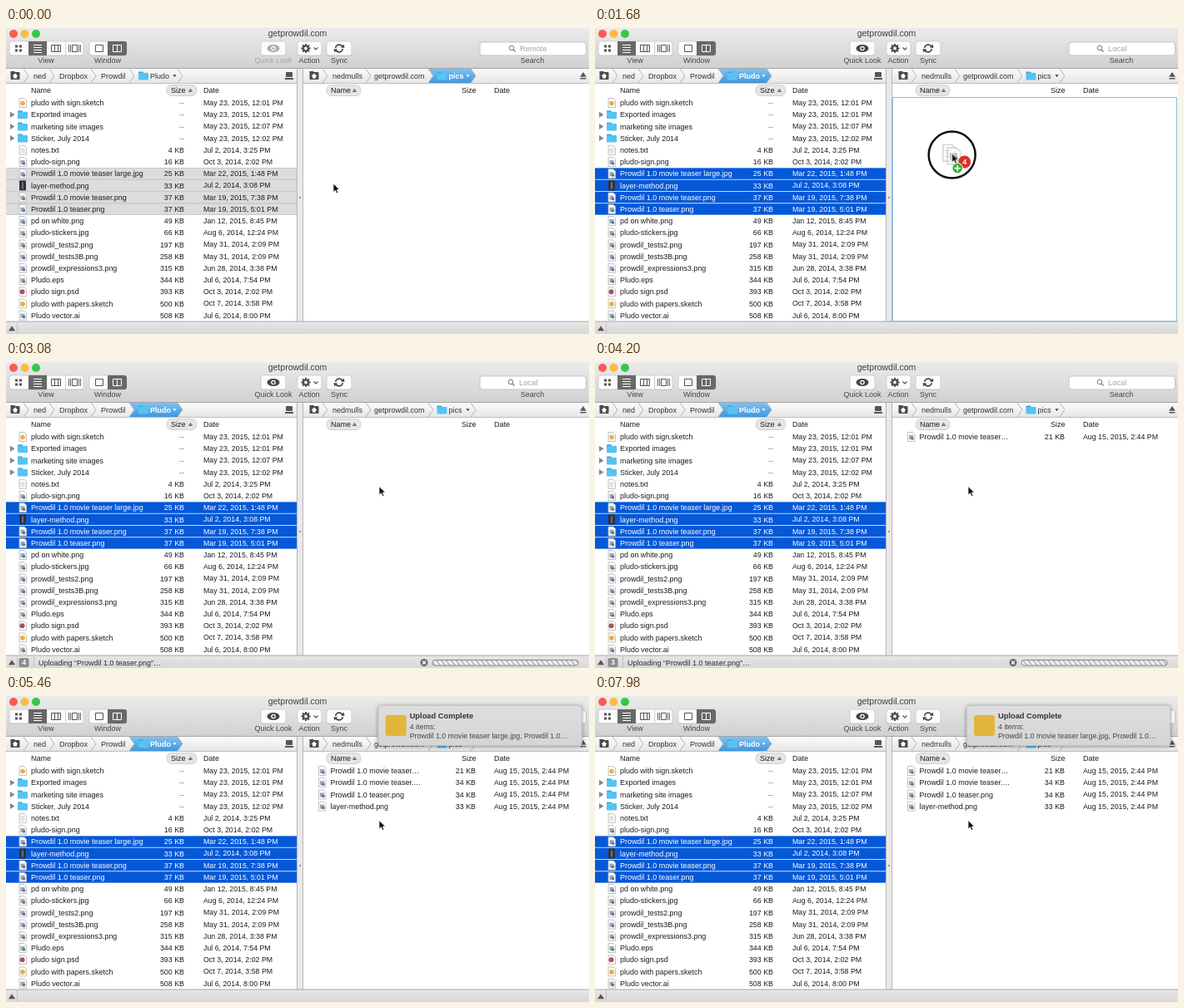
Recreate the animation shown at these times as an HTML page with a canvas. Size 700 by 368 pixels, loop 8000 ms.

```html
<!DOCTYPE html>
<html lang="en">
<head>
<meta charset="utf-8">
<title>File transfer</title>
<style>
html, body { margin: 0; width: 100%; height: 100%; overflow: hidden; background: #fff; }
canvas { display: block; }
</style>
</head>
<body>
<canvas id="stage" width="700" height="368"></canvas>
<script>
const ctx = document.getElementById('stage').getContext('2d');
const LOOP = 8000, ROW = 14.2, FIRST_ROW = 90;
const T = {
  press: 910, dragStart: 1000, focus: 1090, dragEnd: 1830, drop: 2100,
  status: 2380, files: [3920, 4340, 4480, 4620], done: 4690, notice: 4900
};

// icon, name, size in KB, date
const localFiles = [
  ['sketch', 'pludo with sign.sketch', 0, 'May 23, 2015, 12:01 PM'],
  ['folder', 'Exported images', 0, 'May 23, 2015, 12:01 PM'],
  ['folder', 'marketing site images', 0, 'May 23, 2015, 12:07 PM'],
  ['folder', 'Sticker, July 2014', 0, 'May 23, 2015, 12:02 PM'],
  ['text', 'notes.txt', 4, 'Jul 2, 2014, 3:25 PM'],
  ['image', 'pludo-sign.png', 16, 'Oct 3, 2014, 2:02 PM'],
  ['image', 'Prowdil 1.0 movie teaser large.jpg', 25, 'Mar 22, 2015, 1:48 PM'],
  ['dark', 'layer-method.png', 33, 'Jul 2, 2014, 3:08 PM'],
  ['image', 'Prowdil 1.0 movie teaser.png', 37, 'Mar 19, 2015, 7:38 PM'],
  ['image', 'Prowdil 1.0 teaser.png', 37, 'Mar 19, 2015, 5:01 PM'],
  ['image', 'pd on white.png', 49, 'Jan 12, 2015, 8:45 PM'],
  ['image', 'pludo-stickers.jpg', 66, 'Aug 6, 2014, 12:24 PM'],
  ['image', 'prowdil_tests2.png', 197, 'May 31, 2014, 2:09 PM'],
  ['image', 'prowdil_tests3B.png', 258, 'May 31, 2014, 2:09 PM'],
  ['image', 'prowdil_expressions3.png', 315, 'Jun 28, 2014, 3:38 PM'],
  ['image', 'Pludo.eps', 344, 'Jul 6, 2014, 7:54 PM'],
  ['psd', 'pludo sign.psd', 393, 'Oct 3, 2014, 2:02 PM'],
  ['sketch', 'pludo with papers.sketch', 500, 'Oct 7, 2014, 3:58 PM'],
  ['image', 'Pludo vector.ai', 508, 'Jul 6, 2014, 8:00 PM']
];
const remoteFiles = [
  ['Prowdil 1.0 movie teaser…', 21], ['Prowdil 1.0 movie teaser.…', 34],
  ['Prowdil 1.0 teaser.png', 34], ['layer-method.png', 33]
].map(([name, size]) => ['image', name, size, 'Aug 15, 2015, 2:44 PM']);

const clamp = v => Math.min(1, Math.max(0, v));
const progress = (t, from, to) => clamp((t - from) / (to - from));
const easeInOut = p => p < .5 ? 2 * p * p : 1 - 2 * (1 - p) ** 2;
const mix = (a, b, p) => a + (b - a) * p;

function text(s, x, y, color = '#1c1c1c', size = 9, align = 'left', weight = '') {
  ctx.font = `${weight} ${size}px "Liberation Sans", Arial, sans-serif`;
  ctx.textAlign = align;
  ctx.textBaseline = 'alphabetic';
  ctx.fillStyle = color;
  ctx.fillText(s, x, y + size * .35);
}
function box(x, y, w, h, fill, radius = 0, stroke) {
  ctx.beginPath();
  ctx.roundRect(x, y, w, h, radius);
  if (fill) { ctx.fillStyle = fill; ctx.fill(); }
  if (stroke) { ctx.strokeStyle = stroke; ctx.lineWidth = 1; ctx.stroke(); }
}
function disc(x, y, r, fill, stroke, width = 1) {
  ctx.beginPath();
  ctx.arc(x, y, r, 0, 7);
  if (fill) { ctx.fillStyle = fill; ctx.fill(); }
  if (stroke) { ctx.strokeStyle = stroke; ctx.lineWidth = width; ctx.stroke(); }
}
function poly(points, fill, stroke, width = 1) {
  ctx.beginPath();
  points.forEach(([x, y]) => ctx.lineTo(x, y));
  if (fill) { ctx.closePath(); ctx.fillStyle = fill; ctx.fill(); }
  if (stroke) { ctx.strokeStyle = stroke; ctx.lineWidth = width; ctx.stroke(); }
}
function shade(y, h, top, bottom) {
  const g = ctx.createLinearGradient(0, y, 0, y + h);
  g.addColorStop(0, top);
  g.addColorStop(1, bottom);
  return g;
}
const up = (x, y, r, color) => poly([[x - r, y + r * .7], [x, y - r * .8], [x + r, y + r * .7]], color);
const down = (x, y, r, color) => poly([[x - r, y - r * .6], [x + r, y - r * .6], [x, y + r * .8]], color);

function folder(x, y) {
  box(x - 6, y - 5, 6, 4, '#35a9df', 1);
  box(x - 6, y - 3.5, 12, 8.5, '#55c3f3', 1);
}
function fileIcon(kind, x, y) {
  if (kind === 'folder') {
    poly([[5, y - 3.5], [10.5, y], [5, y + 3.5]], '#858585');
    return folder(x, y);
  }
  if (kind === 'dark') {
    box(x - 4, y - 6, 8, 12, '#30333b');
    return box(x - 1, y - 4, 2, 8, '#68707c');
  }
  poly([[x - 4, y - 5.5], [x + 2, y - 5.5], [x + 4.5, y - 3], [x + 4.5, y + 5.5], [x - 4, y + 5.5], [x - 4, y - 5.5]], '#fbfbfb', '#b4b4b4', .8);
  if (kind === 'image') {
    box(x - 2.5, y - 2, 5, 5, '#9aa6b8');
    disc(x + 1.5, y + 2, 1.8, '#65758c');
  }
  if (kind === 'text') for (let i = -2; i < 4; i += 2) box(x - 2.5, y + i, 5, .7, '#b5b5b5');
  if (kind === 'sketch') disc(x, y + .5, 2.8, '#e9b13c');
  if (kind === 'psd') disc(x - .5, y, 3, '#a75262');
}
function fileRow([kind, name, size, date], index, x, sizeX, dateX, color) {
  const y = FIRST_ROW + index * ROW;
  fileIcon(kind, x - 10, y);
  text(name, x, y, color, 8.95);
  text(size ? size + ' KB' : '--', sizeX, y, size ? color : '#777', 8.9, 'right');
  text(date, dateX, y, color, 8.8);
}

function eye(x, y, color) {
  ctx.beginPath();
  ctx.ellipse(x, y, 7.5, 4.5, 0, 0, 7);
  ctx.fillStyle = color;
  ctx.fill();
  disc(x, y, 2.8, '#fff');
  disc(x, y, 1.5, color);
}
function gear(x, y) {
  for (let i = 0; i < 8; i++) {
    const a = i * Math.PI / 4, c = Math.cos(a), s = Math.sin(a);
    poly([[x + c * 3, y + s * 3], [x + c * 5.6, y + s * 5.6]], null, '#4a4a4a', 2);
  }
  disc(x, y, 3, null, '#4a4a4a', 2.2);
}
function syncArrows(x, y) {
  for (const turn of [0, Math.PI]) {
    ctx.save();
    ctx.translate(x, y);
    ctx.rotate(turn);
    ctx.beginPath();
    ctx.arc(0, 0, 4.4, Math.PI * 1.05, Math.PI * 1.85);
    ctx.strokeStyle = '#444';
    ctx.lineWidth = 1.7;
    ctx.stroke();
    poly([[2, -.8], [6.5, -.8], [5.6, -5]], '#444');
    ctx.restore();
  }
}
function button(x, w) {
  box(x, 17, w, 17, '#c2c2c2', 3);
  box(x, 16, w, 17, '#fcfcfc', 3, '#cfcfcf');
}
function toolbar(local) {
  box(0, 0, 700, 48, shade(0, 48, '#ebebeb', '#d1d1d1'));
  box(0, 48, 700, 1, '#a5a5a5');
  ['#fc5b57', '#fdbc40', '#34c84a'].forEach((c, i) => disc(9 + i * 13.5, 7, 5, c));
  text('getprowdil.com', 350, 6.5, '#404040', 10.5, 'center');

  button(4, 89);
  button(100, 45);
  box(27, 16, 22, 17, '#686868');
  box(122, 16, 23, 17, '#686868', [0, 3, 3, 0]);
  box(71, 16, 1, 17, '#d0d0d0');
  for (const x of [11, 16]) for (const y of [20.5, 25.5]) box(x, y, 3, 3, '#555');
  for (let i = 0; i < 4; i++) box(33, 20 + i * 3, 10, 1, '#fff');
  box(54.5, 20.5, 11, 8, null, 0, '#555');
  box(58, 20, 1, 9, '#555');
  box(62, 20, 1, 9, '#555');
  box(79.5, 20.5, 6, 8, null, 0, '#555');
  for (const x of [75, 77, 87, 89]) box(x, 20, 1, 9, '#666');
  box(107.5, 20.5, 9, 8, null, 0, '#555');
  box(128.5, 20.5, 10, 8, null, 0, '#fff');
  box(133, 20, 1, 9, '#fff');

  button(306, 30);
  eye(321, 24.5, local ? '#444' : '#aaa');
  button(350, 29);
  gear(360, 24.5);
  poly([[369.5, 23.5], [372, 26], [374.5, 23.5]], null, '#555', 1.2);
  button(385, 30);
  syncArrows(400, 24.5);

  box(569, 17, 127.5, 16, '#fff', 3, '#c5c5c5');
  const x = local ? 606 : 607;
  disc(x, 24, 2.8, null, '#777');
  poly([[x + 2, 26], [x + 4.5, 28.5]], null, '#777', 1.2);
  text(local ? 'Local' : 'Remote', x + 10, 25, '#a2a2a2', 9.3);

  [['View', 48], ['Window', 122], ['Quick Look', 321], ['Action', 364], ['Sync', 400], ['Search', 632]].forEach(
    ([label, cx]) => text(label, cx, 39, label === 'Quick Look' && !local ? '#a5a5a5' : '#444', 9, 'center'));
}

function chevron(x) {
  poly([[x - 3, 49], [x + 3, 57.5], [x - 3, 66]], null, '#b2b2b2');
}
function pathBar(homeX, crumbs, chevrons, folderX, name, active) {
  const [start, end] = chevrons.slice(-2);
  if (active) poly([[start - 3, 49], [end - 3, 49], [end + 3, 57.5], [end - 3, 66], [start - 3, 66], [start + 3, 57.5]],
    shade(49, 17, '#7fc2f0', '#3d98df'));
  chevrons.forEach(chevron);
  box(homeX - 5.5, 53, 11, 9, '#4c4c4c', 1);
  box(homeX - 5.5, 52, 5, 2, '#4c4c4c');
  poly([[homeX - 3.5, 58], [homeX, 54.5], [homeX + 3.5, 58], [homeX + 2, 58], [homeX + 2, 60.5], [homeX - 2, 60.5], [homeX - 2, 58]], '#fff');
  crumbs.forEach(([label, x]) => text(label, x, 57.5, '#333'));
  folder(folderX, 57.5);
  const color = active ? '#fff' : '#333';
  text(name, folderX + 8, 57.5, color, 9, 'left', active ? 'bold' : '');
  down(end - 6.5, 57.5, 2, color);
}
function headings(nameX, sizeX, dateX, pillX, pillW) {
  box(pillX, 68.5, pillW, 13, '#e6e6e6', 6, '#d0d0d0');
  up(pillX + pillW - 7.5, 75, 2.8, '#777');
  text('Name', nameX, 75);
  text('Size', sizeX, 75);
  text('Date', dateX, 75);
}

function panes(t, local) {
  box(0, 49, 700, 304, '#fff');
  box(0, 49, 700, 17, shade(49, 17, '#fbfbfb', '#e6e6e6'));
  box(0, 66, 700, 1, '#bcbcbc');
  pathBar(11, [['ned', 33], ['Dropbox', 64], ['Prowdil', 114]], [24, 55, 105, 151, 209], 165, 'Pludo', local);
  pathBar(370, [['nedmulls', 392], ['getprowdil.com', 442]], [383, 435, 510, 561], 523.5, 'pics', !local);
  box(336, 53, 8, 6, '#555', 1);
  box(335, 60, 10, 2, '#555');
  up(693, 56, 3.8, '#555');
  box(689.5, 60, 7, 1.5, '#555');
  headings(30, 198, 237, 193, 36);
  headings(390, 547, 586, 385, 41);

  localFiles.forEach((file, i) => {
    const selected = i > 5 && i < 10, top = FIRST_ROW + (i - .5) * ROW;
    if (selected) {
      box(0, top, 349, ROW, local ? '#b8cff1' : '#b9b9b9');
      box(0, top + .5, 349, ROW - 1, local ? '#0558d8' : '#dcdcdc');
    }
    fileRow(file, i, 30, 214, 237, selected && local ? '#fff' : '#1c1c1c');
  });
  remoteFiles.forEach((file, i) => {
    if (t >= T.files[i]) fileRow(file, i, 389.5, 564, 586);
  });

  box(349, 49, 8, 304, '#e9e9e9');
  box(349, 49, 1, 304, '#b5b5b5');
  box(356, 49, 1, 304, '#b5b5b5');
  disc(353, 204, 1.2, '#999');
}

function statusBar(t) {
  box(0, 353, 700, 15, shade(353, 15, '#e6e6e6', '#d8d8d8'));
  box(0, 352.5, 700, 1, '#aaa');
  up(7, 361.5, 4, '#555');
  box(13, 354, 1, 14, '#c2c2c2');
  if (t < T.status || t >= T.done) return;
  box(15.5, 356, 12, 11, '#8c8c8c', 2);
  text(4 - T.files.filter(start => t >= start).length || 1, 21.5, 361.5, '#fff', 8.5, 'center', 'bold');
  box(33, 354, 1, 14, '#c2c2c2');
  text('Uploading “Prowdil 1.0 teaser.png”…', 39, 361.5, '#2b2b2b');
  disc(502, 361.5, 4.5, '#686868');
  for (const d of [-2, 2]) poly([[500, 361.5 - d], [504, 361.5 + d]], null, '#fff', 1.3);

  ctx.save();
  box(512, 358.5, 175, 6.5, '#f7f7f7', 3.2);
  ctx.clip();
  const shift = t * .03 % 6;
  for (let x = 500 + shift; x < 692; x += 6)
    poly([[x, 358], [x + 3, 358], [x + 9, 366], [x + 6, 366]], '#c3c3c3');
  ctx.restore();
  box(512, 358.5, 175, 6.5, null, 3.2, '#858585');
}

function pointerAt(t) {
  if (t < T.dragStart) {
    const p = easeInOut(progress(t, 0, 840));
    return [mix(393, 148, p), mix(187, 174, p)];
  }
  const p = easeInOut(progress(t, T.dragStart, T.dragEnd));
  return [mix(148, 448, p), mix(174, 149.5, p)];
}
function pointer(t) {
  const [x, y] = pointerAt(t);
  const dragging = t >= T.focus && t < T.drop;
  if (dragging && x > 357) box(357.5, 83.5, 341, 269, null, 0, '#7fbde8');
  const held = progress(t, T.press - 20, T.press + 140) * (1 - progress(t, T.drop, T.drop + 170));
  if (held > 0) disc(x, y + 1.5, 28 * held, 'rgba(255,255,255,.25)', '#111', 2.5);
  if (dragging) {
    ctx.save();
    ctx.globalAlpha = .6;
    ctx.translate(x, y + 1);
    ctx.scale(1.8, 1.8);
    fileIcon('text', -2, -1);
    fileIcon('image', 1, 1);
    ctx.restore();
    disc(x + 15, y + 10, 7.5, '#dc2f2b');
    text('4', x + 15, y + 10, '#fff', 9, 'center', 'bold');
    disc(x + 6.5, y + 17.5, 6.2, '#36ad32', '#fff');
    box(x + 3, y + 16.7, 7, 1.8, '#fff');
    box(x + 5.6, y + 14, 1.8, 7, '#fff');
  }
  ctx.lineJoin = 'round';
  poly([[0, 0], [0, 10.5], [2.4, 8.3], [4, 12], [5.9, 11.2], [4.3, 7.6], [7.5, 7.4], [0, 0]].map(
    ([px, py]) => [x + px, y + py]), '#111', '#fff', .8);
}

function notification(t) {
  if (t < T.notice) return;
  const x = 446 + 256 * (1 - progress(t, T.notice, T.notice + 650)) ** 3;
  ctx.save();
  ctx.shadowColor = 'rgba(0,0,0,.4)';
  ctx.shadowBlur = 5;
  ctx.shadowOffsetY = 1;
  box(x, 11, 245, 49, shade(11, 49, '#dedede', '#d5d5d5'), 4);
  ctx.restore();
  box(x + .5, 11.5, 244, 48, null, 4, '#c4c4c4');
  box(x + 9, 23, 25, 25, '#e2b53c', 3);
  text('Upload Complete', x + 38, 24, '#333', 9.3, 'left', 'bold');
  text('4 items:', x + 38, 37, '#444', 8.9);
  text('Prowdil 1.0 movie teaser large.jpg, Prowdil 1.0…', x + 38, 48, '#444', 8.8);
}

function frame(now) {
  const t = now % LOOP, local = t >= T.focus;
  toolbar(local);
  panes(t, local);
  statusBar(t);
  pointer(t);
  notification(t);
  requestAnimationFrame(frame);
}
requestAnimationFrame(frame);
</script>
</body>
</html>
```
